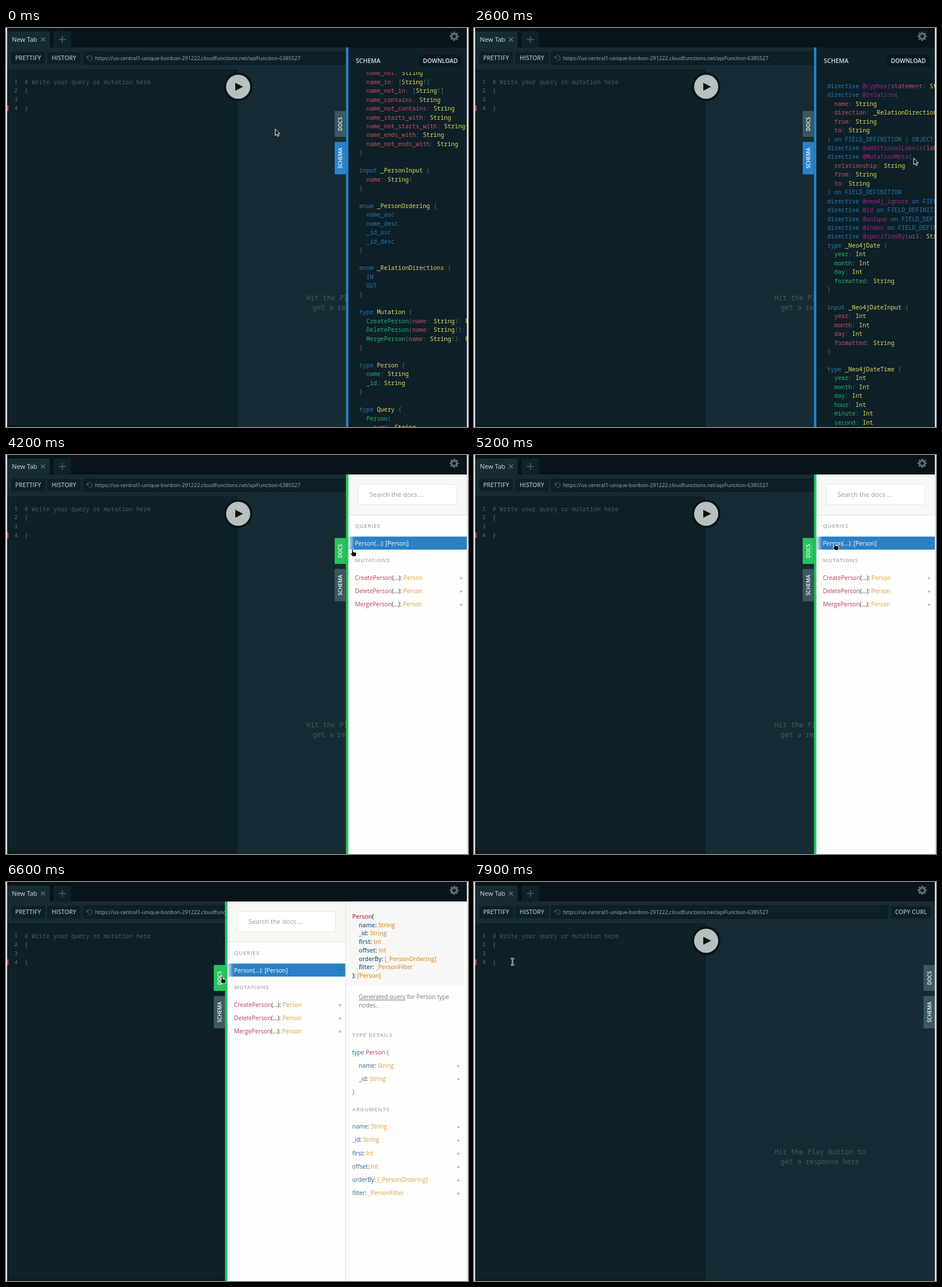
An HTML page that plays this animation: 804 px wide and 696 px high, repeating every 8000 ms.

```html
<!DOCTYPE html>
<html lang="en">
<head>
<meta charset="utf-8">
<title>Query editor with schema and docs drawers</title>
<style>
  html, body { margin: 0; height: 100%; overflow: hidden; background: #0e2028; }
  svg { display: block; }
  text { white-space: pre; font: 10.28px "Open Sans", sans-serif; }
  .mono { font: 10.25px "Noto Sans Mono", monospace; }
  .editor { letter-spacing: .12px; }
  .lineno { font-size: 9px; text-anchor: middle; }
  .hint { font-size: 12px; text-anchor: middle; }
  .semi { font-weight: 600; }
  .mid { text-anchor: middle; }
  .tab { font-size: 11.1px; }
  .side { font-size: 8.9px; }
  .url { font-size: 9.16px; }
  .search { font-size: 11.3px; }
  .heading { font-size: 9.43px; font-weight: 600; letter-spacing: .8px; }
</style>
</head>
<body>
<svg id="stage" width="100%" height="100%" viewBox="0 0 804 696"></svg>
<script>
const LOOP = 8000, STEP = 100, LINE = 15.44, SHIFT = 210.4;
const BAR = '#08141a', LEFT = '#0e2028', RIGHT = '#172b34';
const BLUE = '#2a83c8', GREEN = '#27c45f', TAB = '#3c5860';
const code = { key: '#2779ae', name: '#e0da5e', field: '#2aae69', arg: '#c94d64', directive: '#a0238a', punct: '#5a6d74' };
const doc = { key: '#27658f', name: '#b83c5e', type: '#d99f3c', punct: '#333', grey: '#777' };

const rect = (x, y, w, h, fill, more = '') =>
  `<rect x="${x}" y="${y}" width="${w}" height="${h}" fill="${fill}" ${more}/>`;
const path = (d, more) => `<path d="${d}" ${more}/>`;
const span = (s, fill) => `<tspan fill="${fill}">${s}</tspan>`;
const text = (x, y, s, fill, cls = '', more = '') =>
  `<text x="${x}" y="${y}" fill="${fill}" class="${cls}" ${more}>${s}</text>`;
const group = (id, body) => `<g id="${id}">${body}</g>`;
const button = (x, y, w, label, fill, color) =>
  rect(x, y, w, 21.5, fill, 'rx="2"') + text(x + w / 2, y + 14.5, label, color, 'semi mid');

// ---- main window ----
function editorWindow() {
  const lines = ['# Write your query or mutation here', '{', '', '}'];
  return rect(0, 0, 804, 696, RIGHT) + rect(0, 0, 804, 34, BAR) +
    rect(2, 72, 401, 624, LEFT) + rect(2, 691.5, 401, 5, '#0c1c23') +
    rect(2, 6, 74, 28, RIGHT, 'rx="1"') + text(10.3, 24, 'New Tab', '#d5dcde', 'tab') +
    path('M61 16.5l7 7m0-7l-7 7', 'stroke="#66777d" stroke-width="1.2"') +
    rect(83, 6, 30, 28, '#0f2129', 'rx="1"') +
    path('M92 20h12m-6-6v12', 'stroke="#41535a" stroke-width="2"') +
    '<g fill="none" stroke="#5b6a70"><circle cx="780" cy="14.5" r="4.6" stroke-width="3.6"/>' +
    '<circle cx="780" cy="14.5" r="7" stroke-width="2.4" stroke-dasharray="2.75" stroke-dashoffset="1.37"/></g>' +
    button(9, 41.8, 59, 'PRETTIFY', LEFT, '#a6b2b6') +
    button(72, 41.8, 58, 'HISTORY', LEFT, '#a6b2b6') +
    rect(134.5, 41.5, 586, 22, LEFT, 'rx="2" stroke="#0a191f"') +
    path('M141 49v3.5h3.5M141.3 52a4.3 4.3 0 1 1 3 4.7', 'fill="none" stroke="#5c6c72"') +
    text(155, 56, 'https://us-central1-unique-bonbon-291222.cloudfunctions.net/apiFunction-6385527', '#a3afb3', 'url') +
    button(726, 41.8, 69, 'COPY CURL', LEFT, '#a6b2b6') +
    lines.map((s, i) =>
      text(17.5, 96.8 + i * 15.45, i + 1, '#62757c', 'mono lineno') +
      text(32.3, 97.8 + i * 15.45, s, i ? '#5d7077' : '#4b5e65', 'mono editor')).join('') +
    rect(2, 135, 2.5, 10, '#c8374a') +
    text(602, 475, 'Hit the Play Button to', '#48595f', 'mono hint') +
    text(602, 492, 'get a response here', '#48595f', 'mono hint') +
    `<circle cx="404" cy="102.5" r="25" fill="${BAR}"/><circle cx="404" cy="102.5" r="21" fill="#b8bfbf"/>` +
    path('M399 95.5v14l13.5-7z', 'fill="#0a1216"');
}

// ---- schema drawer ----
const schemaTop = `directive @cypher(statement: String) on FIELD_DEFINITION
directive @relation(
  name: String
  direction: _RelationDirections
  from: String
  to: String
) on FIELD_DEFINITION | OBJECT
directive @additionalLabels(labels: [String]) on OBJECT
directive @MutationMeta(
  relationship: String
  from: String
  to: String
) on FIELD_DEFINITION
directive @neo4j_ignore on FIELD_DEFINITION
directive @id on FIELD_DEFINITION
directive @unique on FIELD_DEFINITION
directive @index on FIELD_DEFINITION
directive @specifiedBy(url: String) on SCALAR
type _Neo4jDate {
  year: Int
  month: Int
  day: Int
  formatted: String
}

input _Neo4jDateInput {
  year: Int
  month: Int
  day: Int
  formatted: String
}

type _Neo4jDateTime {
  year: Int
  month: Int
  day: Int
  hour: Int
  minute: Int
  second: Int`;

const schemaEnd = `  name_not: String
  name_in: [String!]
  name_not_in: [String!]
  name_contains: String
  name_not_contains: String
  name_starts_with: String
  name_not_starts_with: String
  name_ends_with: String
  name_not_ends_with: String
}

input _PersonInput {
  name: String!
}

enum _PersonOrdering {
  name_asc
  name_desc
  _id_asc
  _id_desc
}

enum _RelationDirections {
  IN
  OUT
}

type Mutation {
  CreatePerson(name: String): Person
  DeletePerson(name: String!): Person
  MergePerson(name: String!): Person
}

type Person {
  name: String
  _id: String
}

type Query {
  Person(
    name: String`;

function highlight(source) {
  let block = 'input', depth = 0;
  return source.split('\n').map(line => {
    block = /^\w+/.exec(line)?.[0] ?? block;
    return line.replace(/@\w+|\w+|[^\w\s@]/g, (word, at) => {
      const next = line[at + word.length];
      if (word === '(') depth++;
      if (word === ')') depth--;
      let kind = 'name';
      if (word[0] === '@') kind = 'directive';
      else if (!/\w/.test(word)) kind = 'punct';
      else if (/^(directive|type|input|enum|on|[A-Z]+_DEFINITION|OBJECT|SCALAR)$/.test(word)) kind = 'key';
      else if (block === 'enum' && line[0] === ' ') kind = 'key';
      else if (next === ':' || next === '(') kind = block === 'type' && !depth ? 'field' : 'arg';
      return span(word, code[kind]);
    });
  });
}

const codeView = (id, source, baseline) => group(id,
  '<svg x="597" y="77" width="205" height="619">' +
  highlight(source).map((s, i) => text(17.7, baseline - 77 + i * LINE, s, code.punct, 'mono')).join('') +
  '</svg>');

const stripe = fill => rect(591.6, 34, 4.2, 662, fill);

const schemaDrawer = () => group('schema',
  rect(592, 34, 212, 662, LEFT) + stripe(BLUE) +
  text(608.7, 61, 'SCHEMA', '#d5dcde', 'semi', 'style="font-size:10.6px"') +
  button(718, 46.5, 76, 'DOWNLOAD', '#0a1920', '#e2e7e8') +
  codeView('schemaTop', schemaTop, 104.9) + codeView('schemaEnd', schemaEnd, 82.4));

// ---- docs drawer ----
const arrow = (x, y) => path(`M${x} ${y - 2.5}v5l4.5-2.5z`, 'fill="#b9b9b9"');
const heading = (x, y, s) => text(x, y, s, '#a9a9a9', 'heading');
const call = (y, name, type, colors = [doc.name, doc.punct, doc.type]) =>
  text(607.2, y, span(name, colors[0]) + span('(...): ', colors[1]) + span(type, colors[2]));
const field = (x, y, name, type, cls) =>
  text(x, y, span(name, doc.key) + span(': ', doc.punct) + span(type, doc.type), '', cls);

const docsDrawer = () => group('docs',
  rect(592, 34, 423, 662, '#fefefc') + rect(596, 34, 206, 70, '#f8f8f5') +
  rect(596, 104, 206, 1, '#e0e0de') + stripe(GREEN) +
  rect(613.2, 51.5, 171, 35, '#fff', 'rx="1" stroke="#e6e6e4"') +
  text(632.4, 73.3, 'Search the docs ...', '#989898', 'search') +
  heading(607.2, 127, 'QUERIES') + heading(607.2, 187.3, 'MUTATIONS') +
  group('row', call(157.6, 'Person', '[Person]') + arrow(790.5, 154)) +
  group('activeRow', rect(596, 142.3, 206, 22.7, 'url(#rowFill)') +
    call(157.6, 'Person', '[Person]', ['#fff', '#fff', '#fff']) + path('M791 152v4l3-2z', 'fill="#1f629b"')) +
  ['Create', 'Delete', 'Merge'].map((verb, i) =>
    call(217.7 + i * 23.1, verb + 'Person', 'Person') + arrow(790.5, 214.8 + i * 23.1)).join(''));

function detailColumn() {
  const args = [['name', 'String'], ['_id', 'String'], ['first', 'Int'], ['offset', 'Int'],
    ['orderBy', '[_PersonOrdering]'], ['filter', '_PersonFilter']];
  const signatureY = i => 64 + i * 14.7;
  return group('detail',
    rect(591, 34, 211, 662, '#fefefc') + rect(592, 36, 205, 145, '#f7f7f5') + rect(590.5, 34, 1, 662, '#dcdcda') +
    text(602.5, signatureY(0), span('Person', doc.name) + span('(', doc.punct), '', 'semi') +
    args.map(([name, type], i) =>
      field(614, signatureY(i + 1), name, type, 'semi') +
      field(602.5, 430.3 + i * 23.15, name, type) + arrow(785.5, 427.8 + i * 23.15)).join('') +
    text(602.5, signatureY(7), span('): ', doc.punct) + span('[Person]', doc.type), '', 'semi') +
    text(614, 204.4, '<tspan text-decoration="underline">Generated query</tspan> for Person type', doc.grey) +
    text(614, 219, 'nodes.', doc.grey) +
    heading(602.5, 270.2, 'TYPE DETAILS') +
    text(602.5, 300.5, span('type ', doc.key) + span('Person ', doc.name) + '{', doc.grey) +
    args.slice(0, 2).map(([name, type], i) =>
      field(614, 323.7 + i * 23.1, name, type) + arrow(785.5, 321 + i * 23.1)).join('') +
    text(602.5, 370, '}', doc.grey) + heading(602.5, 400.2, 'ARGUMENTS'));
}

const sideTab = (id, y, h, label) =>
  rect(572, y, 19.6, h, TAB, `id="${id}" rx="1"`) +
  text(0, 0, label, '#fff', 'semi mid side', `transform="translate(585.3 ${y + h / 2}) rotate(-90)"`);

// ---- pointers, drawn around their hot spot ----
const dark = 'fill="#0b0b0b" stroke="#fff" stroke-width="1" stroke-linejoin="round"';
const beam = 'M-3-5.5q3 0 3 1.5q0-1.5 3-1.5M0-4v8M-3 5.5q3 0 3-1.5q0 1.5 3 1.5';
const pointers = {
  arrow: path('M0 0v11.5l2.7-2.4 1.9 4 1.9-.9-1.9-3.9h3.7z', dark),
  hand: path('M-1.3 .5Q0-1 1.2 .5V5l4.5 1q1.5 .5 1.2 2.5L6 13H0L-3.5 8.5q-.5-1.8 2.2-.8z', dark),
  resize: path('M-6.5 0l4-4v2.5h5V-4l4 4-4 4V1.5h-5V4z', dark),
  beam: path(beam, 'fill="none" stroke="#fff" stroke-width="2.4"') +
    path(beam, 'fill="none" stroke="#111" stroke-width=".9"')
};

const stage = document.getElementById('stage');
stage.innerHTML =
  '<defs><linearGradient id="rowFill"><stop stop-color="#d5e5f2"/><stop offset=".05" stop-color="#2a80c4"/></linearGradient></defs>' +
  editorWindow() + schemaDrawer() + docsDrawer() + detailColumn() +
  group('tabs', sideTab('docsTab', 144.8, 45.2, 'DOCS') + sideTab('schemaTab', 198.8, 56.4, 'SCHEMA')) +
  rect(0, 0, 2, 696, '#e3e6e6') + rect(802, 0, 2, 696, '#e3e6e6') +
  group('pointer', Object.entries(pointers).map(([id, body]) => group(id, body)).join(''));

// ---- timeline ----
const panels = [[0, 'schemaEnd'], [600, 'closed'], [2500, 'schemaTop'], [3900, 'docs'], [5300, 'detail'], [6800, 'closed']];
const moves = [
  [0, 468.5, 176, 'arrow'], [100, 466, 179, 'arrow'], [200, 466, 179, 'arrow'], [400, 579, 224, 'hand'],
  [600, 579, 224, 'arrow'], [1100, 593, 231, 'arrow'], [1200, 593, 231, 'arrow'], [1600, 774, 234, 'resize'],
  [1700, 774, 234, 'resize'], [1800, 785, 234, 'hand'], [2200, 792, 236, 'hand'], [2500, 792, 236, 'arrow'],
  [3300, 577, 163, 'hand'], [3500, 577, 164, 'hand'], [3600, 578, 167, 'hand'],
  [4000, 578, 167, 'hand'], [4100, 590, 172, 'arrow'], [4200, 603, 164, 'hand'], [4300, 610, 162, 'hand'],
  [4400, 610, 162, 'hand'], [4600, 616, 159, 'hand'], [4700, 616, 159, 'hand'], [5000, 625, 155, 'hand'],
  [5100, 625, 155, 'hand'], [5200, 628, 153, 'hand'], [5600, 628, 153, 'hand'], [5900, 447.5, 156.5, 'hand'],
  [6000, 393, 158, 'hand'], [6100, 393, 158, 'hand'], [6600, 376, 164, 'hand'], [6800, 376, 164, 'arrow'],
  [7000, 376, 164, 'arrow'], [7100, 345, 172, 'beam'], [7300, 230, 184, 'beam'], [7500, 106, 152, 'beam'],
  [7600, 106, 152, 'beam'], [7900, 67, 139, 'beam']
];
const $ = id => document.getElementById(id);
const show = (id, on) => $(id).style.display = on ? '' : 'none';

function draw(t) {
  const panel = panels.findLast(p => p[0] <= t)[1];
  const isSchema = panel.startsWith('schema'), isDocs = panel === 'docs' || panel === 'detail';
  const shift = panel === 'closed' ? SHIFT : panel === 'detail' ? -SHIFT : 0;
  show('schema', isSchema);
  show('schemaTop', panel === 'schemaTop');
  show('schemaEnd', panel === 'schemaEnd');
  show('docs', isDocs);
  show('detail', panel === 'detail');
  show('row', t < 4200);
  show('activeRow', t >= 4200);
  $('docsTab').setAttribute('fill', isDocs ? GREEN : TAB);
  $('schemaTab').setAttribute('fill', isSchema ? BLUE : TAB);
  for (const id of ['docs', 'tabs']) $(id).setAttribute('transform', `translate(${shift})`);

  const i = moves.findLastIndex(m => m[0] <= t);
  const [t0, x0, y0, shape] = moves[i], [t1, x1, y1] = moves[i + 1] ?? [LOOP, x0, y0];
  const k = (t - t0) / (t1 - t0);
  $('pointer').setAttribute('transform', `translate(${x0 + (x1 - x0) * k} ${y0 + (y1 - y0) * k})`);
  for (const id in pointers) show(id, id === shape);
}

const start = performance.now();
function tick() {
  const t = (performance.now() - start) % LOOP;
  draw(Math.floor(t / STEP) * STEP);
  requestAnimationFrame(tick);
}
tick();
</script>
</body>
</html>
```
